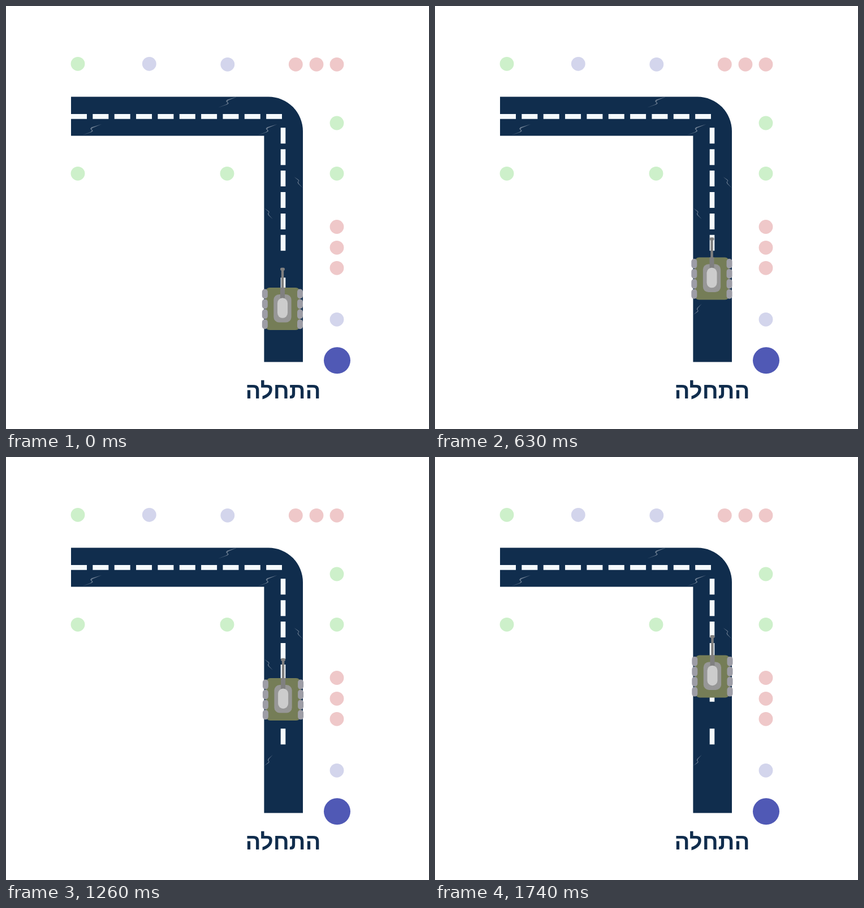
Recreate the animation shown at these times as an HTML page. Size 748 by 748 pixels, loop 2.07 s.

```html
<!DOCTYPE html>
<html lang="he">
<head>
<meta charset="utf-8">
<style>
  html, body { margin: 0; width: 100%; height: 100%; overflow: hidden; background: #fff; }
  svg { display: block; width: 100vw; height: 100vh; }
  text { font: bold 40px "Open Sans", "Noto Sans", "Liberation Sans", sans-serif; }
</style>
</head>
<body>
<svg viewBox="0 0 748 748">
  <defs>
    <path id="wide" d="M0 19.5 14.5 13.7 17 11.5 14 8 16 5.5 34 0 18 6.8 16.2 8.5 18.8 12 16 14Z"/>
    <path id="small" d="M0 0 7.5 5 9 7 7.3 9.5 8.3 12 15 19.5 7 12.3 6 9.5 8 7.2 6.7 5.8Z"/>
  </defs>

  <g id="dots"></g>
  <circle cx="585.5" cy="626.8" r="23.5" fill="#5059b5"/>

  <path fill="#102d4d" d="M115 160.5H464A61 61 0 0 1 525 221.5V629.5H456.4V229.5H115Z"/>
  <g fill="none" stroke="#f5fafd" stroke-width="8.6">
    <path d="M115 195.4H488" stroke-dasharray="28 10.35"/>
    <path d="M490 215.3V434" stroke-dasharray="28 9.9"/>
    <path d="M490 480.3V508.3"/>
  </g>
  <g fill="#8291a3" fill-opacity=".8">
    <use href="#wide" x="375" y="160.3"/>
    <use href="#wide" x="135" y="209"/>
    <use href="#wide" x="445.5" y="209"/>
    <use href="#small" x="509.5" y="302"/>
    <use href="#small" x="456.8" y="357.5"/>
    <use href="#small" transform="translate(456.8 546) scale(1 -1)"/>
  </g>

  <g id="tank">
    <rect x="458.5" y="498" width="61.5" height="75" rx="8" fill="#757d57"/>
    <g id="wheels" fill="#9d9da6"></g>
    <rect x="473.3" y="510" width="31.3" height="49.5" rx="9.5" fill="#979797"/>
    <path fill="#808080" d="M486.8 464H491.2V498H493V517H485V498H486.8Z"/>
    <rect x="485" y="462.7" width="8" height="5.4" rx="2.4" fill="#808080"/>
    <rect x="480" y="516.3" width="18" height="35.5" rx="9" fill="#ccc"/>
  </g>

  <text x="490" y="694" text-anchor="middle" fill="#102d4d">התחלה</text>
</svg>
<script>
const $ = id => document.getElementById(id);
const groups = {
  "#cdf0ca": [[127, 102.3], [127, 296.3], [391, 296.3], [585, 207], [585, 296.3]],
  "#d3d5ec": [[253.3, 102.3], [391.8, 103.3], [585, 554.3]],
  "#efc8c9": [[512.3, 103.3], [549, 103.3], [585, 103.3], [585, 390.5], [585, 427.3], [585, 463.3]]
};
for (const [color, spots] of Object.entries(groups))
  $("dots").innerHTML += spots.map(([x, y]) =>
    `<circle cx="${x}" cy="${y}" r="12.4" fill="${color}"/>`).join("");

for (const x of [452.8, 515])
  for (let i = 0; i < 4; i++)
    $("wheels").innerHTML +=
      `<rect x="${x}" y="${500.5 + 17.9 * i}" width="10" height="17" rx="4.8"/>`;

// Steady drive up the road in 30 ms steps, then a pause at the end.
const LOOP = 2070, DRIVE = 1740, STEP = 30;
const start = performance.now();
function draw() {
  const t = (performance.now() - start) % LOOP;
  const p = Math.min(Math.floor(t / STEP) * STEP, DRIVE) / DRIVE;
  $("tank").setAttribute("transform", `translate(${1.5 * p} ${-147.6 * p})`);
  requestAnimationFrame(draw);
}
draw();
</script>
</body>
</html>
```
